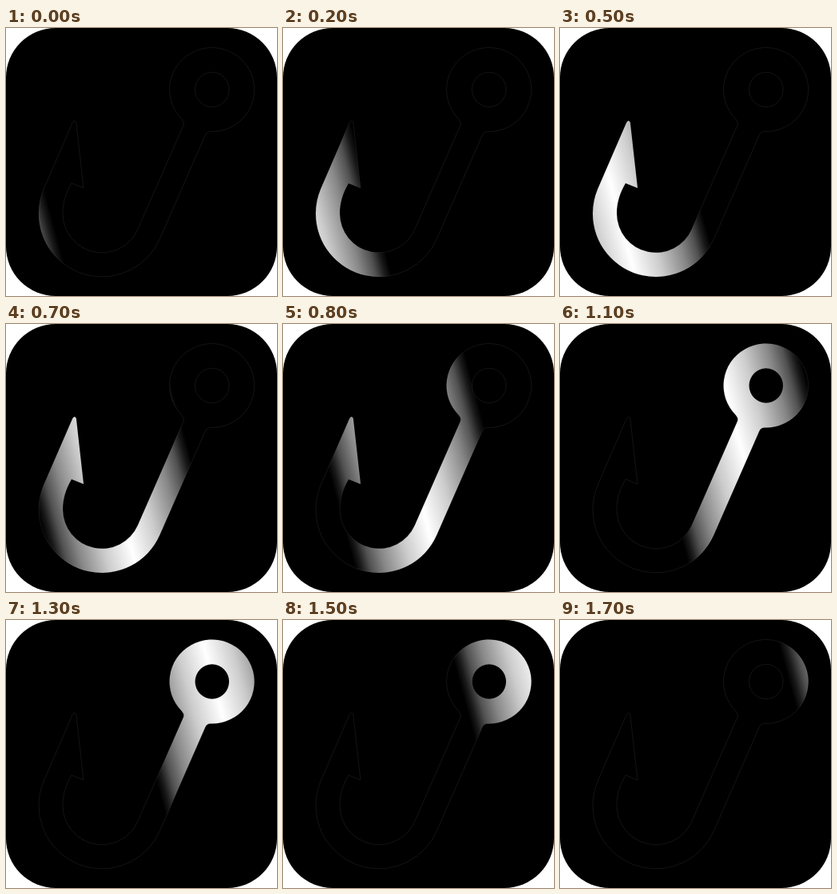
An HTML page for the animation above (1800 ms loop, 339 by 335 pixels).

```html
<!DOCTYPE html>
<html lang="en">
<head>
<meta charset="utf-8">
<title>Hook shimmer</title>
<style>
  html, body { margin: 0; width: 100%; height: 100%; overflow: hidden; background: #fff; }
  svg { display: block; width: 100vw; height: 100vh; }
</style>
</head>
<body>
<svg viewBox="0 0 339 335" preserveAspectRatio="none">
  <defs>
    <linearGradient id="shine" gradientUnits="userSpaceOnUse"></linearGradient>
    <path id="hook" fill-rule="evenodd" d="
      M47.3 201 L83.3 118 Q86 114 87.8 118 L97 200 L82 194
      C75 206 71 218 71 232
      A49 49 0 0 0 164.8 251.7
      L222 121.5 Q223.5 118 220 114
      A53 52.5 0 1 1 257 129.5
      Q251 129 249 134.5
      L192.3 263.8
      A79 79 0 0 1 41 232
      Q41 216 47.3 201 Z
      M236.5 77 a21.3 21.7 0 1 0 42.6 0 a21.3 21.7 0 1 0 -42.6 0 Z"/>
  </defs>
  <rect width="339" height="335" rx="62"/>
  <use href="#hook" fill="none" stroke="#1a1a1a" stroke-width="0.8"/>
  <use href="#hook" fill="url(#shine)"/>
</svg>
<script>
  const LOOP = 1800, STEP = 100, HALF = 105, SLANT = 0.27, MID_Y = 168;
  const shine = document.getElementById('shine');

  // Brightness by distance from the edge of the band, mirrored about its peak.
  const rise = [[0, 0], [8, 0.1], [20, 0.32], [38, 0.53], [70, 0.8], [HALF, 1]];
  const fall = rise.slice(0, -1).reverse().map(([d, a]) => [2 * HALF - d, a]);
  for (const [d, a] of rise.concat(fall)) {
    const stop = document.createElementNS('http://www.w3.org/2000/svg', 'stop');
    stop.setAttribute('offset', d / (2 * HALF));
    stop.setAttribute('stop-color', '#fff');
    stop.setAttribute('stop-opacity', a);
    shine.append(stop);
  }

  // Time and position of the leading edge.
  const path = [[0, 39], [200, 98], [500, 161], [600, 200], [800, 263],
                [1000, 308], [1300, 389], [1700, 521], [1800, 554]];

  function edgeAt(t) {
    const i = path.findIndex(([end]) => t < end);
    const [t0, x0] = path[i - 1], [t1, x1] = path[i];
    return x0 + (x1 - x0) * (t - t0) / (t1 - t0);
  }

  function draw(time) {
    const t = Math.floor((time % LOOP) / STEP) * STEP;
    const x = edgeAt(t) - 2 * HALF;
    const run = 2 * HALF / (1 + SLANT * SLANT);
    shine.setAttribute('x1', x);
    shine.setAttribute('y1', MID_Y);
    shine.setAttribute('x2', x + run);
    shine.setAttribute('y2', MID_Y - SLANT * run);
  }

  let start;
  function tick(now) {
    start ??= now;
    draw(Math.max(0, now - start));
    requestAnimationFrame(tick);
  }
  draw(0);
  requestAnimationFrame(tick);
</script>
</body>
</html>
```
